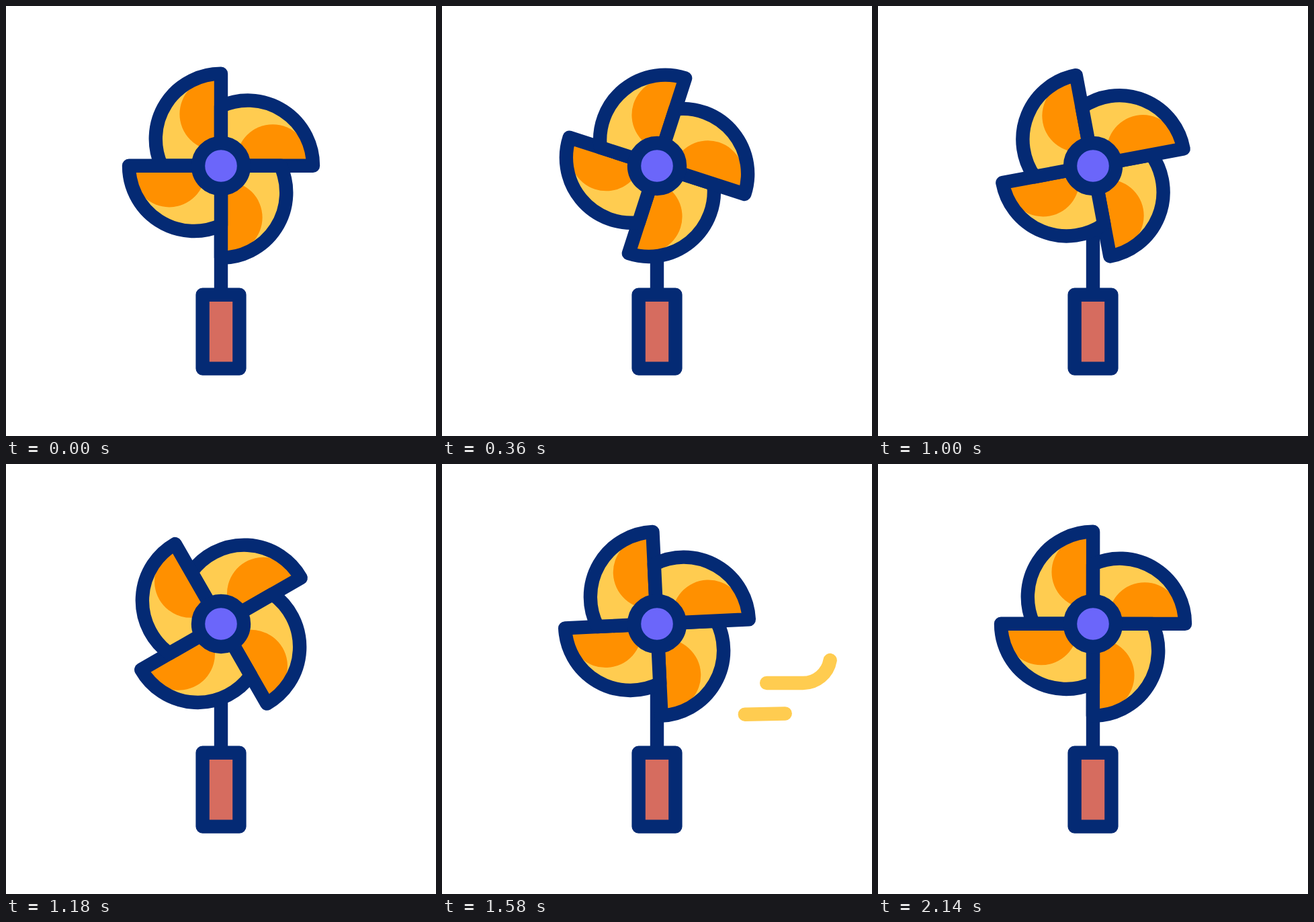
These frames come from a looping animation (640 px wide and 640 px high, 2.4 s). An HTML page:

```html
<!DOCTYPE html>
<html lang="en">
<head>
<meta charset="utf-8">
<title>Pinwheel</title>
<style>
  html, body { margin: 0; width: 100%; height: 100%; overflow: hidden; background: #fff; }
  svg { display: block; width: 100vw; height: 100vh; }
  .line { stroke: #042a74; stroke-width: 20.4; stroke-linecap: round; stroke-linejoin: round; }
  .wind { fill: none; stroke: #ffcc50; stroke-width: 20.4; stroke-linecap: round; }
</style>
</head>
<body>
<svg viewBox="0 0 640 640">
  <defs>
    <path id="outline" d="M0 0V-137A97 97 0 0 0 -88.6 0Z"/>
    <clipPath id="inside"><use href="#outline"/></clipPath>
    <g id="blade">
      <use href="#outline" fill="#ffcc50"/>
      <circle cx="-7.6" cy="-77" r="54" fill="#ff9000" clip-path="url(#inside)"/>
      <use href="#outline" class="line" fill="none"/>
    </g>
  </defs>
  <path class="line" d="M320 238V430"/>
  <rect class="line" x="292.6" y="429.8" width="54.8" height="109.8" fill="#d66c5f"/>
  <g id="wheel">
    <use href="#blade"/>
    <use href="#blade" transform="rotate(90)"/>
    <use href="#blade" transform="rotate(180)"/>
    <use href="#blade" transform="rotate(270)"/>
  </g>
  <circle class="line" cx="320" cy="238" r="34" fill="#6b66fa"/>
  <path id="curl" class="wind" d="M461.5 326H537A41 41 0 0 0 537.5 244"/>
  <path id="gust" class="wind" d="M450 372.7L579 370"/>
</svg>
<script>
const LOOP = 2400;
const SPIN = { duration: 2150, speedUp: 188, slowDown: 554, degrees: -1080 };
const wheel = document.getElementById('wheel');

// Wind strokes: head and tail each travel the path in their own time span.
const winds = [
  { id: 'curl', head: [1280, 1780], tail: [1480, 1980] },
  { id: 'gust', head: [1360, 1820], tail: [1555, 2110] },
].map(wind => {
  const path = document.getElementById(wind.id);
  return { ...wind, path, length: path.getTotalLength() };
});

const progress = (time, [from, to]) => Math.min(1, Math.max(0, (time - from) / (to - from)));
const smooth = x => x * x * (3 - 2 * x);

// Speeds up evenly, turns at a steady rate, then slows down evenly to a stop.
function spinAngle(time) {
  const { duration, speedUp, slowDown, degrees } = SPIN;
  const speed = degrees / (duration - (speedUp + slowDown) / 2);
  const left = Math.max(0, duration - time);
  if (time < speedUp) return speed * time * time / (2 * speedUp);
  if (left < slowDown) return degrees - speed * left * left / (2 * slowDown);
  return speed * (time - speedUp / 2);
}

function draw(time) {
  wheel.setAttribute('transform', `translate(320 237.8) rotate(${spinAngle(time)})`);

  for (const { path, length, head, tail } of winds) {
    const start = smooth(progress(time, tail)) * length;
    const size = smooth(progress(time, head)) * length - start;
    path.style.display = size > 0.01 ? '' : 'none';
    path.style.strokeDasharray = `${Math.max(size, 0.01)} ${length * 2}`;
    path.style.strokeDashoffset = -start;
  }
}

function tick() {
  draw(performance.now() % LOOP);
  requestAnimationFrame(tick);
}
tick();
</script>
</body>
</html>
```
